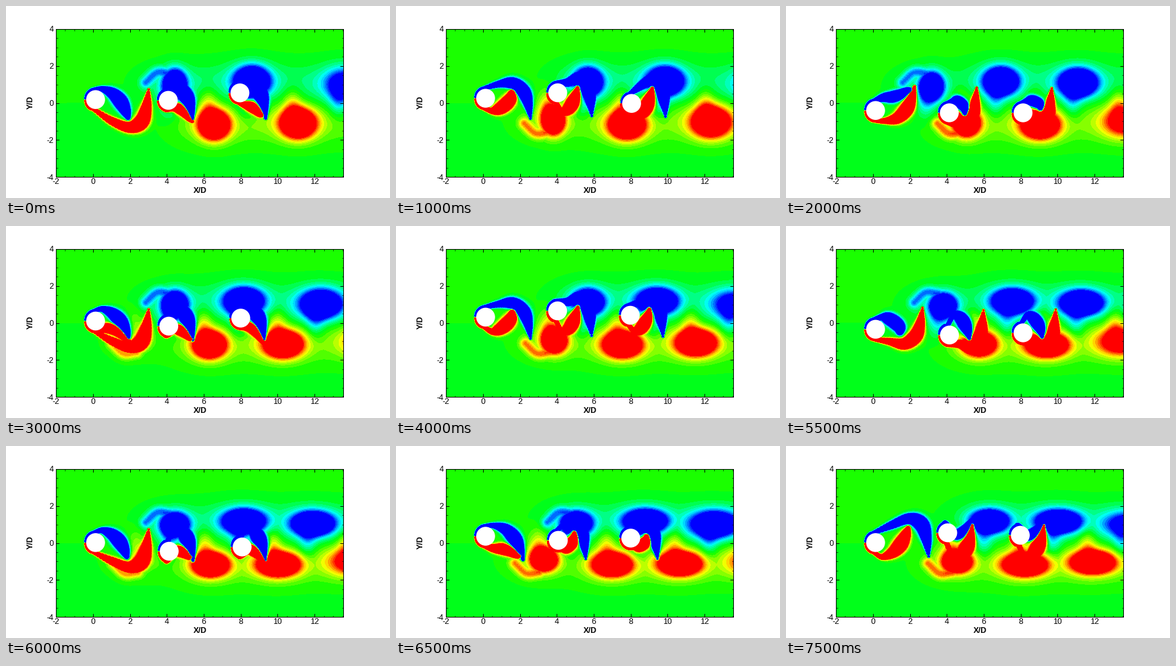
A matplotlib script for the animation above (8000 ms loop, 600x300 px).

```python
import numpy as np
import matplotlib.pyplot as plt
from matplotlib.animation import FuncAnimation
from matplotlib.colors import LinearSegmentedColormap
from matplotlib.lines import Line2D
from matplotlib.patches import Circle
from matplotlib.ticker import MultipleLocator

plt.rcParams["font.family"] = "Liberation Sans"
plt.rcParams["axes.unicode_minus"] = False

W, H, DPI = 600, 300, 100
LEFT, TOP, WIDE, TALL = 78, 36, 449, 231
UNIT = TALL / 8                  # pixels per diameter
AXIS_Y = TOP + TALL / 2
STEPS, INTERVAL = 16, 500

# Cylinders: rest x, sway height, step of the highest point, period, surge,
# age offset of the layer, streamwise squeeze of the layer
CYLINDERS = ((140, 12, 1.1, 6.2, 0, 6, 1),
             (254, 19, 1.4, 6.5, 1.5, .8, .64),
             (368, 16, .2, 7.0, 2.5, -5.4, .64))

# Steps at which each vortex passes the second cylinder; +1 is the upper row
SPEED = 18
BIRTHS = {1: (-14.7, -6.7, 0, 6, 12, 18.2),
          -1: (-10.7, -3.4, 3, 8.9, 14.8, 21)}

# Shear layer as it grows: x, height, radius along its spine at some ages
AGES = (-2.5, -1.2, .4, 1.8, 2.8)
SPINES = np.array([
    [(14, 8, 7), (30, 11, 8), (44, 21, 6), (56, 34, 3), (64, 41, 2)],
    [(10, 9, 5), (20, 7, 9), (30, 1, 10), (37, -6, 9), (38, -13, 6)],
    [(10, 26, 4), (28, 18, 8), (41, 4, 11), (49, -12, 8), (55, -26, 3)],
    [(20, 30, 5), (40, 29, 9), (56, 15, 10), (63, -2, 7), (67, -25, 2)],
    [(25, 28, 6), (52, 38, 8), (71, 30, 11), (79, 8, 8), (83, -21, 2)]], float)

PX = (LEFT + np.arange(WIDE) + .5).astype(np.float32)[None, :]
PY = (TOP + np.arange(TALL) + .5).astype(np.float32)[:, None]


def ramp(x, start, end):
    return float(np.clip((x - start) / (end - start), 0, 1))


def spread(x, y, rx, ry):
    """Squared elliptic distance from a point."""
    return ((PX - x) / rx) ** 2 + ((PY - y) / ry) ** 2


def profile(q, peak):
    """Bell that falls to 1, or to half of a weak peak, near q = 1."""
    return peak * np.exp(-np.log(max(peak, 2)) * q)


def spline(p, n=6):
    """Catmull-Rom curve through the points."""
    q = np.vstack([2 * p[0] - p[1], p, 2 * p[-1] - p[-2]])
    a, b, c, d = (q[i:len(q) - 3 + i, None] for i in range(4))
    t = np.linspace(0, 1, n, endpoint=False)[None, :, None]
    s = b + .5 * t * (c - a + t * (2 * a - 5 * b + 4 * c - d
                                   + t * (3 * (b - c) + d - a)))
    return np.vstack([s.reshape(-1, 3), p[-1]])


def stroke(sheet, peak, points):
    """Raise the sheet along a curve of varying radius."""
    x, y, r = spline(np.array(points, float)).T.astype(np.float32)
    r = np.maximum(r, 1.2)
    reach = 3.5 * r
    i0, i1 = np.searchsorted(PX[0], [(x - reach).min(), (x + reach).max()])
    j0, j1 = np.searchsorted(PY[:, 0], [(y - reach).min(), (y + reach).max()])
    if i0 == i1 or j0 == j1:
        return
    gx, gy = PX[:, i0:i1], PY[j0:j1]
    q = np.full((j1 - j0, i1 - i0), 99, np.float32)
    for a, b, c in zip(x, y, r):
        np.minimum(q, ((gx - a) ** 2 + (gy - b) ** 2) / c ** 2, out=q)
    part = sheet[j0:j1, i0:i1]
    np.maximum(part, profile(q, peak), out=part)


def cylinder_at(n, step):
    x, height, top, period, surge = CYLINDERS[n][:5]
    wave = np.cos(2 * np.pi * (step - top) / period)
    return x - surge * wave, AXIS_Y - height * wave


def layer(sheet, n, side, age, center):
    """Shear layer from the front of a cylinder to its free tip."""
    squeeze = CYLINDERS[n][6]
    cx, cy = center
    angle = np.radians(np.linspace(172, 100, 5))
    arc = np.column_stack([cx + 15.5 * np.cos(angle),
                           cy - side * 15.5 * np.sin(angle),
                           np.linspace(2.2, 3.2, 5)])
    i = int(np.clip(np.searchsorted(AGES, age) - 1, 0, len(AGES) - 2))
    u = ramp(age, AGES[i], AGES[i + 1])
    x, v, r = ((1 - u) * SPINES[i] + u * SPINES[i + 1]).T
    x = x * squeeze
    y = AXIS_Y - side * v
    if n:
        y = y + .5 * (cy - AXIS_Y) * np.exp(-x / 25)
    stroke(sheet, 5, np.vstack([arc, np.column_stack([cx + x, y, r])]))


def vortex(sheet, soft, side, step, age):
    """Free vortex: core, halo, inner arm and the strand behind it."""
    x = 156 + SPEED * age
    grown = ramp(age, 2.7, 3.6)
    v = 26 + 8 * ramp(x, 235, 315) - 5 * ramp(x, 420, 500)
    y = AXIS_Y - side * v
    rx = (17 + 10 * ramp(x, 254, 364)) * (.85 + .015 * step) * grown
    ry = 18.5 * (1.08 - .018 * step) * grown
    core = profile(spread(x, y, rx, ry), 2.6 - 1.6 * ramp(x, 480, 530))
    np.maximum(sheet, core, out=sheet)
    soft -= side * grown * (
        .28 * np.exp(-spread(x - 4, y, 46, 27))
        + .42 * np.exp(-spread(x - 9, AXIS_Y - side * 4, 14, 26)))
    if age < 7.5:
        stroke(sheet, .65, [(x - dx, AXIS_Y - side * h, 7)
                            for dx, h in ((8, 46), (28, 48), (46, 32))])


def flow(step):
    sheets = {side: np.zeros((TALL, WIDE), np.float32) for side in BIRTHS}
    centers = [cylinder_at(n, step) for n in range(3)]
    far = 1 / (1 + np.exp((285 - PX) / 22))
    soft = .02 * np.tanh((AXIS_Y - PY) / 15) + 0 * PX
    for side, births in BIRTHS.items():
        sheet = sheets[side]
        soft -= side * .18 * far * np.exp(-((PY - AXIS_Y + side * 32) / 30) ** 2)
        for birth in births:
            if step - birth > -3:
                vortex(sheet, soft, side, step, step - birth + 6)
            for n, center in enumerate(centers):
                age = step - birth + CYLINDERS[n][5]
                if -2.9 <= age <= 3.4:
                    layer(sheet, n, side, age, center)
    return sheets[-1] - sheets[1] + soft, centers


FRAMES = [flow(k) for k in range(STEPS)]


def to_data(p):
    return (p[0] - LEFT) / UNIT - 2, 4 - (p[1] - TOP) / UNIT


fig = plt.figure(figsize=(W / DPI, H / DPI), dpi=DPI, facecolor="white")
ax = fig.add_axes([LEFT / W, 1 - (TOP + TALL) / H, WIDE / W, TALL / H])
rainbow = LinearSegmentedColormap.from_list(
    "rainbow20", ["blue", "cyan", "lime", "yellow", "red"], N=20)
x_max = WIDE / UNIT - 2
image = ax.imshow(FRAMES[0][0], cmap=rainbow, vmin=-1, vmax=1, aspect="auto",
                  extent=(-2, x_max, -4, 4), interpolation="nearest")
discs = [ax.add_patch(Circle(to_data(c), .51, fc="white", ec="none", zorder=2))
         for c in FRAMES[0][1]]

ax.set_xlim(-2, x_max)
ax.set_ylim(-4, 4)
for axis in (ax.xaxis, ax.yaxis):
    axis.set_major_locator(MultipleLocator(2))
    axis.set_minor_locator(MultipleLocator(.5))
ax.tick_params(which="both", direction="in", top=True, right=True,
               width=.72, labelsize=9, pad=2.6)
ax.tick_params(axis="x", pad=1.6)
ax.tick_params(which="major", length=3.6)
ax.tick_params(which="minor", length=1.8, width=.5)
for edge in ax.spines.values():
    edge.set_linewidth(.72)

label = dict(fontsize=9, fontweight="bold", ha="center", va="center")
fig.text(303 / W, 1 - 289.5 / H, "X/D", **label)
fig.text(39 / W, 1 - 151 / H, "Y/D", rotation=90, **label)
for xs, ys in (((0, 1), (.5 / H, .5 / H)), ((1 - .5 / W, 1 - .5 / W), (0, 1))):
    fig.add_artist(Line2D(xs, ys, color="#606060", lw=.72))


def update(step):
    field, centers = FRAMES[step]
    image.set_data(field)
    for disc, c in zip(discs, centers):
        disc.center = to_data(c)
    return [image, *discs]


anim = FuncAnimation(fig, update, frames=STEPS, interval=INTERVAL,
                     repeat=True, repeat_delay=0, blit=False)
plt.show()
```
